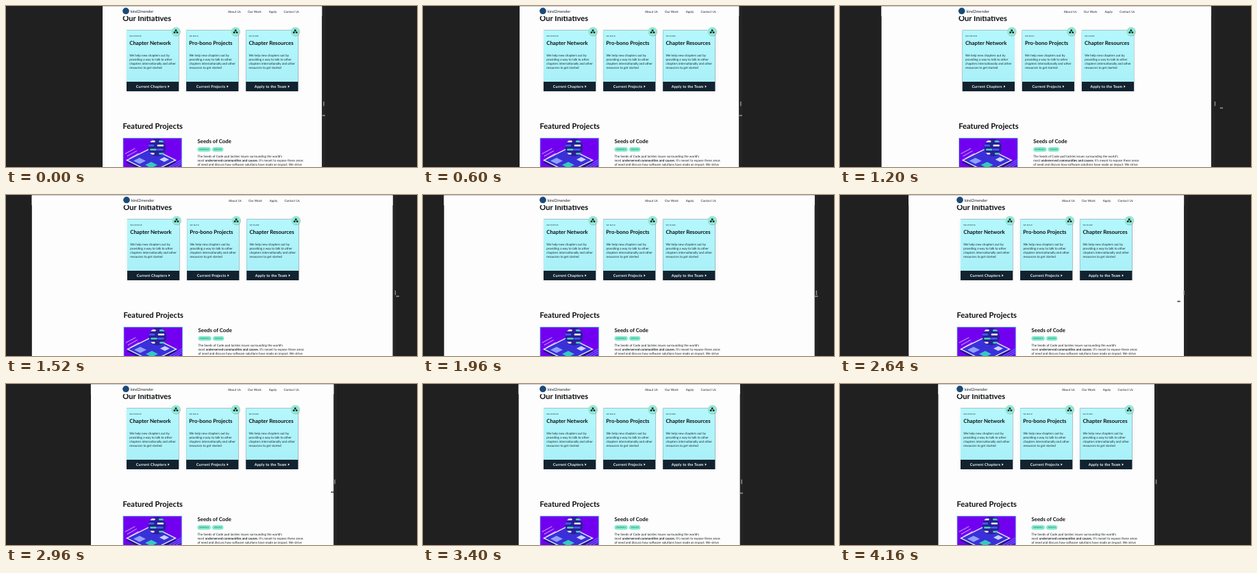
Animation of 600 by 236 pixels, one loop 4200 ms. Source, as an HTML page with a canvas:

```html
<!DOCTYPE html>
<html lang="en">
<head>
<meta charset="utf-8">
<title>Responsive page preview</title>
<style>
html, body { margin: 0; width: 100%; height: 100%; overflow: hidden; background: #202020; }
canvas { display: block; width: 600px; height: 236px; }
</style>
</head>
<body>
<canvas id="stage"></canvas>
<script>
const W = 600, H = 236, LOOP = 4200, STEP = 40;
const canvas = document.getElementById('stage');
const ctx = canvas.getContext('2d');
const dpr = window.devicePixelRatio || 1;
canvas.width = W * dpr;
canvas.height = H * dpr;

const INK = '#14171a', NAVY = '#12222f', BLACK = '#0b0d0f', MINT = '#7eeaca';

const progress = (t, start, length) => Math.min(1, Math.max(0, (t - start) / length));
const easeOut = (u, power) => 1 - (1 - u) ** power;
// Rises at once and dies away: how far things trail the drag
const trail = (u, power) => u * (1 - u) ** power;

// The window is dragged wide, then narrow again
function pose(t) {
  const wide = progress(t, 624, 1200), narrow = progress(t, 2122, 1890);
  const left = 141 - 110.5 * easeOut(wide, 2) + 112.8 * easeOut(narrow, 3);
  const right = 602.3 - left;
  const ahead = trail(wide, 2), behind = trail(narrow, 5);
  return {
    left, right,
    shift: 20.8 * ahead,
    grip: right + 2.5 + 23 * ahead - 45 * behind,
    x: right + 2.5 + 96 * ahead - 180 * behind,
    y: 160.5 - 12 * (easeOut(wide, 4) - easeOut(narrow, 3))
  };
}

function text(str, x, y, size, weight = 400, color = INK, spacing = 0) {
  ctx.font = `${weight} ${size}px Lato, "Open Sans", sans-serif`;
  ctx.letterSpacing = spacing + 'px';
  ctx.fillStyle = color;
  ctx.fillText(str, x, y);
  return x + ctx.measureText(str).width;
}

function rect(x, y, w, h, color) {
  ctx.fillStyle = color;
  ctx.fillRect(x, y, w, h);
}

function disc(x, y, r, color) {
  ctx.fillStyle = color;
  ctx.beginPath();
  ctx.arc(x, y, r, 0, Math.PI * 2);
  ctx.fill();
}

function poly(points, color) {
  ctx.fillStyle = color;
  ctx.beginPath();
  points.forEach(([x, y]) => ctx.lineTo(x, y));
  ctx.closePath();
  ctx.fill();
}

function line(points, color, width) {
  ctx.strokeStyle = color;
  ctx.lineWidth = width;
  ctx.lineCap = ctx.lineJoin = 'round';
  ctx.beginPath();
  points.forEach(([x, y]) => ctx.lineTo(x, y));
  ctx.stroke();
}

function pill(x, y, w, h, color) {
  ctx.fillStyle = color;
  ctx.beginPath();
  ctx.roundRect(x, y, w, h, h / 2);
  ctx.fill();
}

const cards = [
  ['WE MENTOR', 'Chapter Network', 'Current Chapters'],
  ['WE BUILD', 'Pro-bono Projects', 'Current Projects'],
  ['WE SHARE', 'Chapter Resources', 'Apply to the Team']
];
const blurb = ['We help new chapters out by', 'providing a way to talk to other',
  'chapters internationally and other', 'resources to get started'];

function badge(x, y) {
  disc(x + .3, y + .5, 6.7, 'rgba(40,70,70,.3)');
  disc(x, y, 6.3, '#92ead3');
  line([[x - 2, y + 1.5], [x, y - 1.6], [x + 2, y + 1.5]], NAVY, .6);
  [[0, -1.6], [-2, 1.5], [2, 1.5]].forEach(([dx, dy]) =>
    rect(x + dx - 1.3, y + dy - 1.2, 2.6, 2.4, NAVY));
}

function card([kicker, title, action], x) {
  const w = 76.3, top = 35.6, bar = 111, bottom = 125;
  ctx.save();
  ctx.shadowColor = 'rgba(30,60,80,.1)';
  ctx.shadowBlur = 5 * dpr;
  rect(x, top, w, bottom - top, NAVY);
  ctx.restore();
  const fill = ctx.createLinearGradient(0, top, 0, bar);
  fill.addColorStop(0, '#b4f8fd');
  fill.addColorStop(1, '#aaf0f8');
  rect(x, top, w, bar - top, fill);
  text(kicker, x + 4.3, 45, 2.75, 400, '#1f3c48', .05);
  text(title, x + 4.2, 56.5, 7.85, 700, '#0c1216');
  blurb.forEach((s, i) => text(s, x + 4.3, 73.6 + i * 6.2, 4.57, 400, '#16232a'));

  ctx.font = '700 5.4px Lato, "Open Sans", sans-serif';
  ctx.letterSpacing = '.2px';
  const start = x + (w - ctx.measureText(action).width - 4.4) / 2;
  const tip = text(action, start, 120, 5.4, 700, '#fff', .2) + 2.2;
  poly([[tip, 116.2], [tip + 2.2, 118], [tip, 119.8]], '#fff');
  badge(x + 72, 37.3);
}

const tile = (x, y, r, color) =>
  poly([[x - r, y], [x, y - r / 2], [x + r, y], [x, y + r / 2]], color);

function globe(x, y, r) {
  const colors = ['#f3f0ff', '#45dcb5', '#4b5ff0'];
  ctx.save();
  disc(x, y, r, '#2b1f9a');
  ctx.beginPath();
  ctx.arc(x, y, r, 0, Math.PI * 2);
  ctx.clip();
  for (let i = 0; i < 8; i++) {
    const dx = (i % 2 ? 5 : -8) + Math.sin(i * 2) * 2;
    const dy = -9 + Math.floor(i / 2) * 6;
    line([[x + dx - 3, y + dy], [x + dx + 4, y + dy]], colors[i % 3], 2.6);
  }
  ctx.restore();
}

function picture() {
  ctx.save();
  rect(170.5, 193, 86.7, 43, '#7edfe6');
  ctx.beginPath();
  ctx.rect(171.3, 194, 85, 42);
  ctx.clip();
  rect(171, 193, 86, 43, '#7200f0');
  for (let i = 0; i < 3; i++) {
    const y = 213.5 + i * 3.6, x = 238 + i * 5;
    line([[174 + i * 3, y + 3], [188 + i * 2.5, y - 4.5]], '#e9dcff', .8);
    line([[x, 236], [x + 18, 225.5]], '#4f8df2', 1);
  }
  // Tilted phone
  tile(212, 229, 37, '#21188c');
  tile(212, 226, 37, '#f0eaff');
  tile(212, 226, 34, '#3a30d8');
  tile(195, 227, 9, '#8fa0ff');
  tile(212, 233, 9, '#35c8c4');
  tile(231, 225, 7, '#c9cfff');
  globe(220.5, 207.5, 12.8);
  ctx.restore();
}

function tag(str, x, w) {
  pill(x, 207, w, 6.4, MINT);
  text(str, x + 2.7, 211.2, 2.45, 400, '#185a56');
}

function project() {
  const x = 279.5, y = 222, gap = 6.2, size = 4.6;
  text('Seeds of Code', x, 200.7, 7.8, 700, '#0d1114');
  tag('INFORMALS', x, 19.3);
  tag('PODCAST', x + 21.6, 16.2);
  text("The Seeds of Code pod tackles issues surrounding the world's", x, y, size);
  let end = text('most ', x, y + gap, size);
  end = text('underserved communities and causes', end, y + gap, size, 700);
  text(". It's meant to expose these areas", end, y + gap, size);
  text('of need and discuss how software solutions have made an impact. We strive',
    x, y + gap * 2, size);
}

function nav() {
  rect(0, 0, W, 15, '#fdfdfd');
  disc(175, 7.3, 4.8, '#1b4a78');
  text('kind2mender', 181.7, 9.6, 5.8, 400, '#1a1f24');
  [['About Us', 324], ['Our Work', 353], ['Apply', 383.7], ['Contact Us', 405.5]]
    .forEach(([s, x]) => text(s, x, 9.7, 4.55, 400, '#1c2226'));
}

function page(left, right, shift) {
  ctx.save();
  ctx.beginPath();
  ctx.rect(left, .6, right - left, H);
  ctx.clip();
  rect(left, 0, right - left, H, '#fdfdfd');
  ctx.translate(shift, 0);
  text('Our Initiatives', 170.3, 22.3, 11.2, 700, BLACK);
  cards.forEach((c, i) => card(c, 176 + i * 87.1));
  text('Featured Projects', 170.5, 179.7, 11.2, 700, BLACK);
  picture();
  project();
  nav();
  ctx.restore();
}

function cursor(x, y, color) {
  for (const side of [-1, 1]) {
    poly([[x + side * 2.4, y], [x + side * .7, y - 1.5], [x + side * .7, y + 1.5]], color);
  }
  rect(x - 1, y - .4, 2, .8, color);
}

function draw(t) {
  const p = pose(t);
  ctx.setTransform(dpr, 0, 0, dpr, 0, 0);
  ctx.textRendering = 'geometricPrecision';
  rect(0, 0, W, H, '#202020');
  rect(p.right, 0, 5, H, '#242424');
  page(p.left, p.right, p.shift);
  rect(p.grip - .7, 140, 1.5, 6.6, '#8b8b8b');
  if (t < 3800) cursor(p.x, p.y, p.x < p.right ? '#222' : '#a4a4a4');
}

const start = performance.now();
function tick() {
  const t = (performance.now() - start) % LOOP;
  draw(Math.floor(t / STEP) * STEP);
  requestAnimationFrame(tick);
}
draw(0);
requestAnimationFrame(tick);
</script>
</body>
</html>
```
